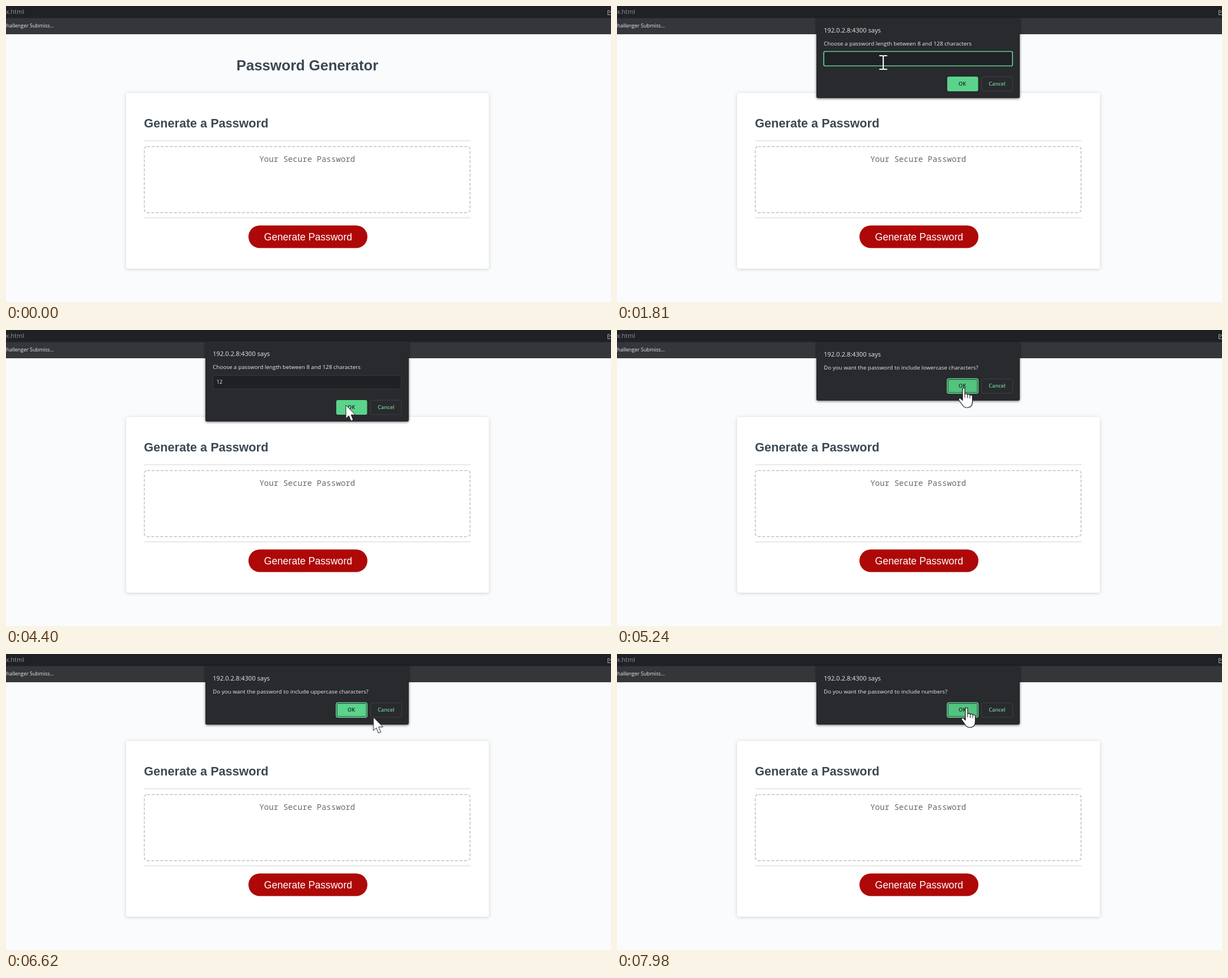
An HTML page for the animation above (8000 ms loop, 1068 px wide and 524 px high).

```html
<!DOCTYPE html>
<html lang="en">
<head>
<meta charset="utf-8">
<title>Password Generator</title>
<style>
  html, body { margin: 0; width: 100%; height: 100%; overflow: hidden; background: #f9fbfd; }
  svg { display: block; width: 1068px; height: 524px; }
  text { white-space: pre; }

  .page { font-family: "Liberation Sans", Arial, sans-serif; fill: #3b4853; }
  .bold { font-weight: 700; }
  .mid { text-anchor: middle; }
  .end { text-anchor: end; }
  .hint { font: 14.1px "Noto Sans Mono", monospace; fill: #6b6b6b; }
  .ui { font-family: "Open Sans", "Noto Sans", sans-serif; fill: #e8eaed; }
  .card { filter: drop-shadow(0 1.6px 3px rgba(0, 0, 0, .17)); }
  .panel { fill: #292a2d; filter: drop-shadow(0 1px 2px rgba(0, 0, 0, .6)); }
  .msg { font-size: 9.83px; }
  .label { font-size: 9.2px; font-weight: 600; text-anchor: middle; }
  .box { fill: #292a2d; stroke: #3c4043; }
  .green { fill: #5bd38c; }
  .outline { fill: #fff; stroke: #16181b; stroke-linejoin: round; }

  /* Every timeline shares the 8 s loop: 1% is 80 ms. */
  .sheet  { animation: pose 8s linear infinite; }
  .cursor { animation: travel 8s linear infinite; }
  .step   { animation: 8s step-end infinite; }
  .prompt { animation-name: prompt; }
  .confirm { animation-name: confirm; }
  .lower  { animation-name: lower; }
  .upper  { animation-name: upper; }
  .number { animation-name: number; }
  .focus  { animation-name: focus; }
  .caret  { animation-name: caret; }
  .one    { animation-name: one; }
  .two    { animation-name: two; }
  .hot    { animation-name: hot; }
  .hand   { animation-name: hand; }
  .arrow  { animation-name: arrow; }
  .beam   { animation-name: beam; }

  /* Dialogs slide down while fading in, and up while fading out. */
  @keyframes pose {
    0%, 12% { opacity: 0; transform: translateY(-12px); }
    13.1% { opacity: .6; transform: translateY(-7px); }
    14.1% { opacity: .9; transform: translateY(-3px); }
    15.1%, 54.95% { opacity: 1; transform: translateY(0); }
    54.98%, 56.1% { opacity: 1; transform: translateY(-1px); }
    56.15% { opacity: .6; transform: translateY(-5px); }
    57.1% { opacity: 0; transform: translateY(-10px); }
    57.5% { opacity: 0; transform: translateY(-12px); }
    58.75% { opacity: .75; transform: translateY(-5px); }
    60% { opacity: 1; transform: translateY(-1px); }
    60.6%, 69.3% { opacity: 1; transform: translateY(0); }
    69.4% { opacity: 1; transform: translateY(-1px); }
    70.2% { opacity: .5; transform: translateY(-5px); }
    71%, 71.2% { opacity: 0; transform: translateY(-12px); }
    72.2% { opacity: .8; transform: translateY(-4px); }
    73.1%, 73.98% { opacity: 1; transform: translateY(-1px); }
    74.1%, 86.2% { opacity: 1; transform: translateY(0); }
    87% { opacity: .5; transform: translateY(-5px); }
    88%, 88.3% { opacity: 0; transform: translateY(-12px); }
    89.22%, 90.2% { opacity: .85; transform: translateY(-4px); }
    90.25% { opacity: .97; transform: translateY(-2px); }
    91.2%, 100% { opacity: 1; transform: translateY(0); }
  }
  @keyframes prompt { 0% { opacity: 1; } 57.2%, 100% { opacity: 0; } }
  @keyframes confirm { 0% { opacity: 0; } 57.2%, 100% { opacity: 1; } }
  @keyframes lower { 0% { opacity: 1; } 71.1%, 100% { opacity: 0; } }
  @keyframes upper { 0% { opacity: 0; } 71.1% { opacity: 1; } 88.1%, 100% { opacity: 0; } }
  @keyframes number { 0% { opacity: 0; } 88.1%, 100% { opacity: 1; } }
  @keyframes focus { 0% { opacity: 1; } 54.98%, 100% { opacity: 0; } }
  @keyframes one { 0% { opacity: 0; } 36.87%, 100% { opacity: 1; } }
  @keyframes two { 0% { opacity: 0; } 38%, 100% { opacity: 1; } }
  @keyframes caret {
    0% { opacity: 0; transform: translateX(0); }
    25.5% { opacity: 1; transform: translateX(0); }
    32.1% { opacity: 0; transform: translateX(0); }
    36.87% { opacity: 1; transform: translateX(5.3px); }
    38% { opacity: 1; transform: translateX(10.6px); }
    44.5% { opacity: 0; transform: translateX(10.6px); }
    50.25% { opacity: 1; transform: translateX(10.6px); }
    53.1%, 100% { opacity: 0; transform: translateX(10.6px); }
  }
  @keyframes hot {
    0% { fill: #5bd38c; }
    51.2% { fill: #52c47f; }
    53.1% { fill: #5bd38c; }
    62.6% { fill: #52c47f; }
    76.8% { fill: #5bd38c; }
    94%, 100% { fill: #52c47f; }
  }

  @keyframes travel {
    0% { opacity: 0; transform: translate(800px, 491px); }
    2.61% { opacity: 0; transform: translate(800px, 491px); }
    2.62% { opacity: 1; transform: translate(800px, 491px); animation-timing-function: ease-out; }
    10.12%, 15.6% { opacity: 1; transform: translate(581px, 419px); animation-timing-function: ease-in-out; }
    21.6% { transform: translate(471px, 97px); }
    22.6%, 23.6% { transform: translate(470px, 100px); }
    25.5%, 39.5% { transform: translate(464px, 106px); animation-timing-function: ease-in-out; }
    46.5%, 60.5% { transform: translate(600px, 133px); animation-timing-function: ease-in-out; }
    63.6%, 65.45% { transform: translate(611px, 104px); }
    65.48%, 69.4% { transform: translate(612px, 102.5px); }
    70.3%, 74% { transform: translate(611px, 101.5px); }
    75%, 76.8% { transform: translate(612px, 126px); }
    78%, 79.8% { transform: translate(612px, 131px); animation-timing-function: ease-in-out; }
    85%, 91.2% { transform: translate(671px, 100px); animation-timing-function: ease-in-out; }
    95.87%, 99.7% { transform: translate(613px, 93px); }
    99.74%, 100% { opacity: 1; transform: translate(617px, 95px); }
  }
  @keyframes hand {
    0% { opacity: 0; }
    9% { opacity: 1; }
    16% { opacity: 0; }
    45.5% { opacity: 1; }
    54.98% { opacity: 0; }
    62.6% { opacity: 1; }
    74.4% { opacity: 0; }
    83.5% { opacity: 1; }
    92.6% { opacity: 0; }
    94%, 100% { opacity: 1; }
  }
  @keyframes arrow {
    0% { opacity: 1; }
    9% { opacity: 0; }
    16% { opacity: 1; }
    20.6% { opacity: 0; }
    40.5% { opacity: 1; }
    45.5% { opacity: 0; }
    54.98% { opacity: 1; }
    62.6% { opacity: 0; }
    74.4% { opacity: 1; }
    83.5% { opacity: 0; }
    92.6% { opacity: 1; }
    94%, 100% { opacity: 0; }
  }
  @keyframes beam { 0% { opacity: 0; } 20.6% { opacity: 1; } 40.5%, 100% { opacity: 0; } }
</style>
</head>
<body>
<svg viewBox="0 0 1068 524" xmlns="http://www.w3.org/2000/svg">
  <rect width="1068" height="524" fill="#f9fbfd"/>

  <!-- browser bars -->
  <rect width="1068" height="50" fill="#35363a"/>
  <rect width="1068" height="21.5" fill="#202124"/>
  <g class="ui">
    <text class="end" x="32" y="13.7" font-size="11" fill="#92949b">ex.html</text>
    <text class="end" x="84.5" y="38.3" font-size="9">Challenger Submiss...</text>
  </g>
  <path d="M1066 8H1062.5V15.5H1068M1065 12.5Q1065.5 9.5 1068 9.5" fill="none" stroke="#a5a8ad" stroke-width="1.1"/>

  <!-- page -->
  <g class="page">
    <text class="mid bold" x="532" y="113.6" font-size="25.6">Password Generator</text>
    <rect class="card" x="212" y="154" width="640.5" height="311" rx="4" fill="#fff"/>
    <text class="bold" x="243.5" y="214.6" font-size="21.6">Generate a Password</text>
    <path d="M244 238.5H820M244 375H820" stroke="#e1e1e1" stroke-width="1.5"/>
    <rect x="244.2" y="248.7" width="575" height="117" rx="5" fill="none" stroke="#c0c0c0" stroke-width="1.5" stroke-dasharray="5 3"/>
    <text class="hint mid" x="531.7" y="275.7">Your Secure Password</text>
    <rect x="428" y="388.5" width="210" height="40" rx="20" fill="#ae0808"/>
    <text class="mid" x="533.3" y="414.7" font-size="17.6" fill="#fff">Generate Password</text>
  </g>

  <!-- dialogs -->
  <g class="sheet ui">
    <g class="step prompt">
      <path class="panel" d="M352 21H711V160Q711 163 708 163H355Q352 163 352 160Z"/>
      <text class="msg" x="365" y="69.6">Choose a password length between 8 and 128 characters</text>
      <rect x="365.5" y="81.5" width="332" height="24" rx="2" fill="#202124" stroke="#35373b"/>
      <rect class="step focus" x="365" y="80.5" width="333.2" height="25.5" rx="2.5" fill="#202124" stroke="#62cf92" stroke-width="1.7"/>
      <g font-size="9.3">
        <text class="step one" x="371.5" y="95.8">1</text>
        <text class="step two" x="376.8" y="95.8">2</text>
      </g>
      <rect class="step caret" x="371.3" y="85" width="1" height="14"/>
      <rect class="green step hot" x="583" y="125" width="54.5" height="26" rx="3"/>
      <text class="label" x="609.5" y="140.8" fill="#202124">OK</text>
      <rect class="box" x="643.5" y="125.3" width="55" height="25.5" rx="3"/>
      <text class="label" x="671" y="140.8" fill="#74cd9b">Cancel</text>
    </g>
    <g class="step confirm">
      <path class="panel" d="M352 21H711V122Q711 125 708 125H355Q352 125 352 122Z"/>
      <g class="msg">
        <text class="step lower" x="365" y="69.6">Do you want the password to include lowercase characters?</text>
        <text class="step upper" x="365" y="69.6">Do you want the password to include uppercase characters?</text>
        <text class="step number" x="365" y="69.6">Do you want the password to include numbers?</text>
      </g>
      <rect x="583" y="86.3" width="54.4" height="25.6" rx="3" fill="#202a26" stroke="#66d898" stroke-width="1.6"/>
      <rect class="green step hot" x="584.7" y="88" width="51" height="22.2" rx="1.5"/>
      <text class="label" x="609.5" y="102.4" fill="#202124">OK</text>
      <rect class="box" x="643.5" y="86.5" width="55" height="25.5" rx="3"/>
      <text class="label" x="671" y="102.4" fill="#74cd9b">Cancel</text>
    </g>
    <text x="365" y="47.4" font-size="11.15">192.0.2.8:4300 says</text>
  </g>

  <!-- pointer -->
  <g class="cursor">
    <path class="step arrow outline" d="M0 0V23.8L5.2 18.8 8.9 28 13 26.3 9.2 17.2H16.8Z"/>
    <g class="step hand">
      <path class="outline" stroke-width="1.2" d="M-2 2C-2-.6 2-.6 2 2V11C3 9.5 6.5 9.8 6.5 12 7.5 10.6 11 11 11 13.2 12 12 15.5 12.5 15.5 15V24C15.5 31 12 35 5.5 35 1 35-1.5 32-3.5 28.5L-8.5 21.5C-10 19-7 17-5 19L-2 22Z"/>
      <path d="M2 11V17.5M6.5 12V18M11 13.5V18.5" stroke="#16181b" fill="none"/>
    </g>
    <path class="step beam" d="M-7-12H-2Q0-12 0-10 0-12 2-12H7M-7 12H-2Q0 12 0 10 0 12 2 12H7M0-11V11" fill="none" stroke="#f1f1f1" stroke-width="2.2"/>
  </g>
</svg>
</body>
</html>
```
